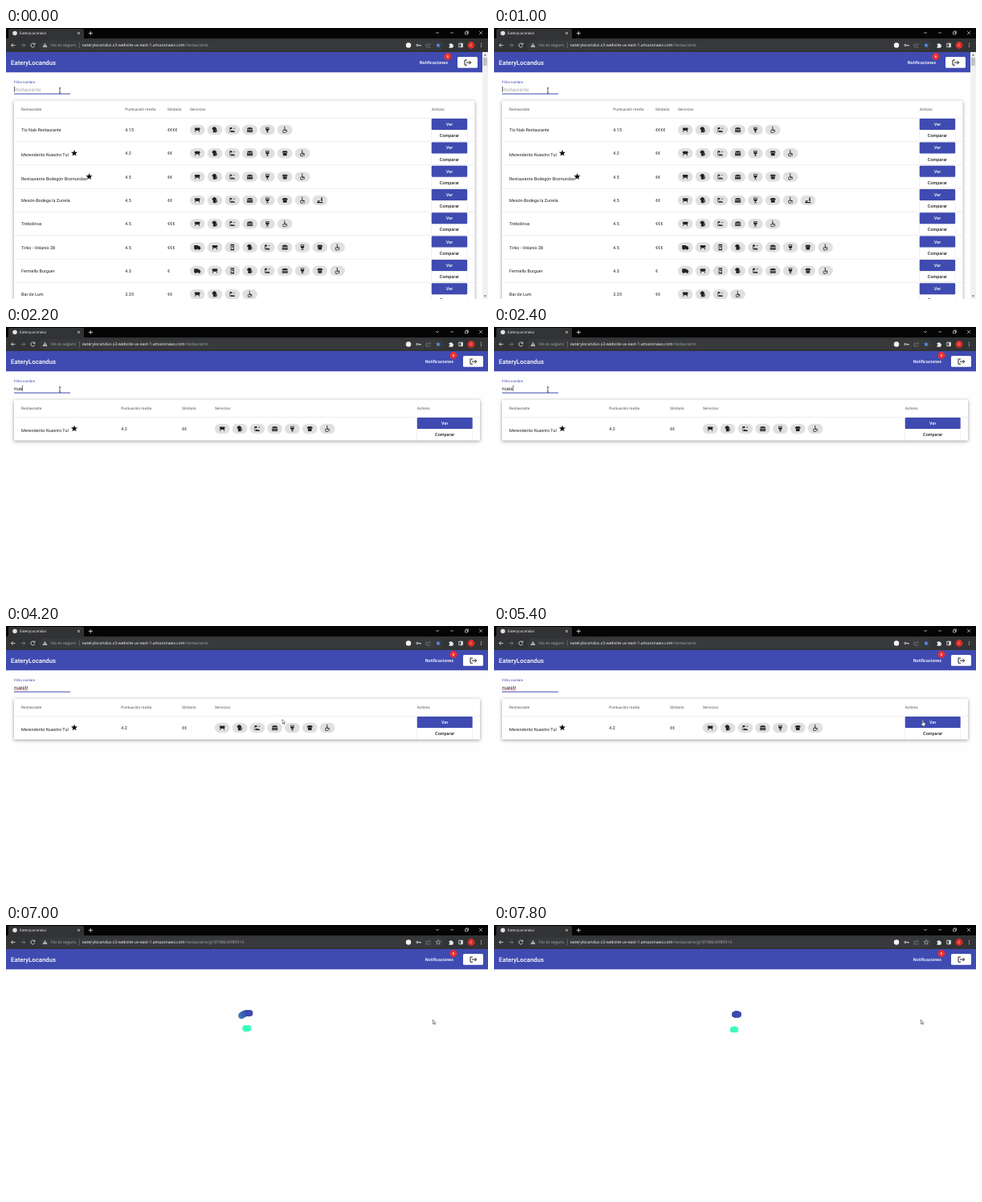
An HTML page for the animation above (8000 ms loop, 600x338 px).

```html
<!DOCTYPE html>
<html lang="es">
<head>
<meta charset="utf-8">
<title>EateryLocandus</title>
<style>
  html, body { margin: 0; width: 100%; height: 100%; overflow: hidden; background: #fefefe; }
  svg { display: block; width: 100%; height: 100%; }
  text { font: 5.47px Roboto, sans-serif; fill: #222; text-rendering: geometricPrecision; white-space: pre; }
  .ui { font: 5.1px "Open Sans", sans-serif; fill: #fff; }
  .ui.tab { font-size: 4.5px; }
  .dim { fill: #a9acb0; }
  .title { font-size: 7.8px; font-weight: 500; fill: #fff; }
  .head { font-size: 4.69px; font-weight: 500; fill: #757575; }
  .bold { font-weight: 500; }
  .white { fill: #fff; }
  .mid { text-anchor: middle; }
  .field { font-size: 6.25px; }
  .line { fill: none; stroke: #e8eaed; stroke-width: .8; }
  .card { fill: #fff; filter: drop-shadow(0 1.5px 2px #0006); }
  .button { fill: #fff; filter: drop-shadow(0 .5px .5px #0004); }
</style>
</head>
<body>
<svg id="stage" viewBox="0 0 600 338" preserveAspectRatio="none"></svg>
<script>
const INDIGO = '#3f4bb1', MINT = '#3dfcbc';
const BRAND = 'EateryLocandus';
const LOOP = 8000, STEP = 200, FILTERED = 2200, OPENED = 5800;
const ROW = 29.3;

// Service icons on a 24 unit grid
const ICONS = {
  T: 'M4 5h16l2 6h-3l1 9h-2l-.7-5H6.7L6 20H4l1-9H2z',
  B: 'M6 10h10v1h2a2 2 0 0 1 2 2v4a2 2 0 0 1-2 2h-2v2H6zM16 13v4h2v-4zM4 11a4 4 0 0 1 2-7a5 5 0 0 1 9 1a2.5 2.5 0 0 1 1 5H6v2z',
  O: 'M3 4h8v5H5v11H3zM5 20l5-7 4 4 3-3 4 6zM16 6h5v2h-5z',
  H: 'M2 10c0-8 20-8 20 0zM2 12h20v3H2zM2 16h20v2a2 2 0 0 1-2 2H4a2 2 0 0 1-2-2z',
  W: 'M6 3h12v7a6 6 0 0 1-5 6v3h3v2H8v-2h3v-3a6 6 0 0 1-5-6zm2 2v3h8V5z',
  P: 'M2 8l5-4h10l5 4-1 2H3zM5 11h14l-1 9H6z',
  A: 'M9 3a2 2 0 1 1 4 0a2 2 0 0 1-4 0zM10 6h3v6h6v9h-2v-6h-7zM9 11v2a4 4 0 1 0 5 5h2a6 6 0 1 1-7-7z',
  D: 'M1 5h14v3h4l4 5v5h-2a3 3 0 0 1-6 0h-5a3 3 0 0 1-6 0H1z',
  K: 'M6 2h12v20H6zm2 4v12h8V6zm2 2h4v5h-4z',
  S: 'M2 18h20v3H2zM4 13h7v4H4zM16 3h4v12h-4z'
};

const RESTAURANTS = [
  ['Tío Nab Restaurante', '4.15', '€€€€', 'TBOHWA'],
  ['Merenderito Nuestro Tul', '4.2', '€€', 'TBOHWPA', 85],
  ['Restaurante Bodegón Bromundas', '4.5', '€€', 'TBOHWPA', 103.5],
  ['Mesón-Bodega la Zurrela', '4.5', '€€', 'TBOHWPAS'],
  ['Trebolinos', '4.5', '€€€', 'TBOHWA'],
  ['Tirko - Velanio 38', '4.5', '€€€', 'DTKBOHWPA'],
  ['Fermello Burguer', '4.3', '€', 'DTKBOHWPA'],
  ['Bar de Lum', '3.35', '€€', 'TBOA']
];

const text = (x, y, content, cls = '') => `<text x="${x}" y="${y}" class="${cls}">${content}</text>`;
const rect = (x, y, w, h, fill, r = 0, cls = '') =>
  `<rect x="${x}" y="${y}" width="${w}" height="${h}" rx="${r}" fill="${fill}" class="${cls}"/>`;
const circle = (x, y, r, fill) => `<circle cx="${x}" cy="${y}" r="${r}" fill="${fill}"/>`;
const line = (d, style = '') => `<path d="${d}" class="line" style="${style}"/>`;
const path = (d, fill) => `<path d="${d}" fill="${fill}" fill-rule="evenodd"/>`;
const group = (id, content) => `<g id="${id}">${content}</g>`;

function star(x, y, r, attrs) {
  const points = Array.from({ length: 10 }, (_, i) => {
    const a = i * Math.PI / 5, d = i % 2 ? r * .42 : r;
    return [x + d * Math.sin(a), y - d * Math.cos(a)].map(v => v.toFixed(2));
  });
  return `<polygon points="${points.join(' ')}" ${attrs}/>`;
}

function browser() {
  return rect(0, 0, 600, 14, '#050505') + rect(0, 13, 600, 17, '#323335')
    + path('M1 13.5q2 0 2-2V3q0-2 2-2h90q2 0 2 2v8.5q0 2 2 2z', '#323335')
    + circle(11, 6.5, 2.8, '#e0e0e0') + text(17, 8.2, BRAND, 'ui tab')
    + line('M89 5l3 3m0-3l-3 3M102.8 6.5h5m-2.5-2.5v5')
    + line('M535 5l2 2 2-2M553 6h4M589 4l4 4m0-4l-4 4M571.5 5h3v3h-3zM572.5 5V4h3v3h-1', 'stroke-width:.6')
    + rect(41, 15.2, 504, 12.8, '#38393b', 6.4)
    + line('M11.5 21.5h-5m2.2-2.3L6.4 21.5l2.3 2.3')
    + line('M18.7 21.5h5m-2.2-2.3l2.3 2.3-2.3 2.3', 'stroke:#85888c')
    + line('M35.4 20a2.5 2.5 0 1 0 .4 2.2M35.9 18.6v1.9H34')
    + path('M48.5 18.7l3 5.3h-6zm-.3 1.9v1.6h.6v-1.6zm0 2.2v.6h.6v-.6z', '#bdc1c6')
    + text(56, 23.4, 'No es seguro', 'ui dim') + rect(91, 18, .5, 7, '#85888c')
    + `<text x="95" y="23.4" class="ui">${BRAND.toLowerCase()}.s3-website-us-east-1.amazonaws.com`
    + '<tspan id="route" class="dim"></tspan></text>'
    + circle(501, 21.5, 3.2, '#f4f4f4')
    + line('M513 21.5h3.2v1.2m-1.2-1.2v1M513 21.5a1.1 1.1 0 1 0-2.2 0a1.1 1.1 0 1 0 2.2 0')
    + line('M525 20h-2v4h5v-1.3M524.5 22.5q.3-2.4 3.7-2.4m-1.2-1.4l1.4 1.4-1.4 1.4', 'stroke:#85888c;stroke-width:.6')
    + star(538, 21.6, 3.2, 'id="bookmark"')
    + path('M551.5 20h1.3a1 1 0 0 1 2 0h1.4v1.4a1 1 0 0 1 0 2v1.4h-4.7v-1.5a1 1 0 0 0 0-2z', '#e8eaed')
    + line('M563.8 19.2h4.6v4.6h-4.6z') + rect(566.3, 19.2, 2, 4.6, '#e8eaed')
    + circle(579, 21.5, 4.4, '#d92d25') + text(579, 23.2, 'C', 'ui tab mid')
    + [-2, 0, 2].map(d => circle(591.5, 21.5 + d, .6, '#e8eaed')).join('');
}

function appBar(right) {
  const x = right - 31;
  return rect(0, 30, right, 25.3, INDIGO) + text(6, 45.6, BRAND, 'title')
    + text(right - 78.3, 44.9, 'Notificaciones', 'bold white')
    + circle(right - 43, 35.5, 4.4, '#f02d2d')
    + `<text x="${right - 43}" y="37" class="white mid" style="font-size:4px;font-weight:700">0</text>`
    + rect(x, 36, 25, 13.8, '#fff', 1.5)
    + line(`M${x + 12} 40h-3v6.2h3M${x + 11} 43.1h5.5m-2-2.2l2.2 2.2-2.2 2.2`, 'stroke:#222;stroke-width:1');
}

function chips(services, x, y) {
  return [...services].map((key, i) => {
    const cx = x + 9.2 + i * 21.8;
    return rect(cx - 9.3, y - 6.2, 18.6, 12.4, '#e0e0e0', 6.2)
      + `<g transform="translate(${cx - 4.4} ${y - 4.4}) scale(.365)">${path(ICONS[key], '#222')}</g>`;
  }).join('');
}

function table(rows, columns, right, buttonWidth) {
  const [name, score, price, services, actions] = columns;
  const titles = ['Restaurante', 'Puntuación media', 'Símbolo', 'Servicios', 'Actions'];
  const center = actions + buttonWidth / 2;
  return rect(10, 90.8, right - 10, 21.5 + rows.length * ROW, '#fff', 1, 'card')
    + titles.map((title, i) => text(columns[i], 102.7, title, 'head')).join('')
    + rows.map(([label, points, symbol, offer, starX], i) => {
      const top = 112 + i * ROW, y = top + 15;
      return rect(10, top, right - 10, .5, '#dcdcdc')
        + text(name, y + (starX ? 4 : 2), label)
        + (starX ? star(starX, y - .2, 4.3, 'fill="#111"') : '')
        + text(score, y + 2, points) + text(price, y + 2, symbol)
        + chips(offer, services, y)
        + rect(actions, top + 15.6, buttonWidth, 13.4, '#fff', 1.2, 'button')
        + rect(actions, top + 1.1, buttonWidth, 14, INDIGO, 1.2)
        + text(center, top + 10, 'Ver', 'bold white mid')
        + text(center, top + 24.2, 'Comparar', 'bold mid');
    }).join('');
}

function scrollbar() {
  return rect(593, 30, 7, 308, '#f1f1f1') + rect(594, 37, 5, 10, '#c1c1c1')
    + path('M595 34.5l1.5-2 1.5 2zM595 333.5l1.5 2 1.5-2z', '#555');
}

const filter = `<text x="10" y="69" style="font-size:4.4px;fill:${INDIGO}">Filtro nombre</text>`
  + '<text id="query" x="10" y="78.5" class="field"></text>'
  + rect(10, 81.6, 70, 1, INDIGO)
  + '<rect id="caret" y="72.5" width=".6" height="7.6" fill="#222"/>'
  + `<path id="spelling" d="M10 79.7${'q.6-.9 1.2 0t1.2 0'.repeat(7)}" fill="none" stroke="#d33" stroke-width=".5"/>`;

const stage = document.getElementById('stage');
stage.innerHTML = rect(0, 0, 600, 338, '#fefefe')
  + group('fullList', appBar(593) + table(RESTAURANTS, [19, 148.3, 201, 229, 529.7], 583.5, 44.5) + scrollbar())
  + group('narrowBar', appBar(600))
  + group('match', table([RESTAURANTS[1]], [19, 143.3, 219, 260, 511.7], 590, 69))
  + group('filter', filter) + group('loader', '') + browser()
  + group('pointer',
    line('M-1.2-3.2h2.4M0-3.2v6.4M-1.2 3.2h2.4', 'stroke:#222;stroke-width:.7')
    + '<path d="M0 0v5.4l1.3-1.1 .8 1.9 .9-.4-.8-1.8h1.6z" fill="#fff" stroke="#222" stroke-width=".5"/>'
    + '<path d="M-.8 3.2L-2 2.2q-.9 0-.4.8L-.6 5.8h3l.6-3.2q0-.8-1.8-1L.6 1.4v-3.2q-.7-1-1.4 0z" fill="#fff" stroke="#222" stroke-width=".5"/>');

const el = id => document.getElementById(id);
const show = (node, visible) => node.setAttribute('display', visible ? 'inline' : 'none');
const lerp = (a, b, k) => a + (b - a) * k;
const ramp = (t, from, to) => {
  const k = Math.min(1, Math.max(0, (t - from) / (to - from)));
  return k * k * (3 - 2 * k);
};

// Moment at which each letter of the query appears
const KEYS = [1600, 1800, 2200, 2400, 2600, 2700];

function drawQuery(t) {
  const typed = 'nuestr'.slice(0, KEYS.filter(k => k <= t).length);
  const query = el('query');
  query.textContent = typed || 'Restaurante';
  query.style.fill = typed ? '#222' : '#aaa';
  const lastKey = typed ? KEYS[typed.length - 1] : 0;
  el('caret').setAttribute('x', typed ? 10.2 + query.getComputedTextLength() : 10);
  show(el('caret'), (t - lastKey) % 1000 < 500);
  show(el('spelling'), t >= 3800);
}

function drawPointer(t) {
  const first = ramp(t, 3600, 4200), second = ramp(t, 4200, 4800), opened = t >= OPENED;
  const x = opened ? 531.3 : lerp(lerp(67, 344, first), 534, second);
  const y = opened ? 118 : lerp(lerp(78, 116.5, first), 119, second);
  el('pointer').setAttribute('transform', `translate(${x} ${y})`);
  const shape = t < 3800 ? 0 : opened || t < 4800 ? 1 : 2;
  [...el('pointer').children].forEach((node, i) => show(node, i === shape));
}

// A dotted arc that opens and closes beside a small mint trail
function drawLoader(t) {
  const open = (1 + Math.cos((t - 6400) / 1400 * 3 * Math.PI)) / 2;
  const radius = lerp(11, 19.6, open), span = lerp(.4, Math.PI, open);
  const first = lerp(-.2, 0, open), centerX = lerp(302, 300, open);
  let dots = '';
  for (let i = 36; i >= 0; i--) {
    const a = first + span * i / 36;
    const mint = Math.min(100, Math.max(0, a / Math.PI * 130));
    dots += circle(centerX - radius * Math.sin(a), 122.4 - radius * Math.cos(a), 3.7,
      `color-mix(in srgb, ${MINT} ${mint}%, ${INDIGO})`);
  }
  for (let i = 0; i < 9; i++) {
    const k = i / 8;
    dots += circle(lerp(297.5, 300, open) + k * lerp(3, 6.3, open), lerp(130.4, 122.8 - k, open), 3.7, MINT);
  }
  el('loader').innerHTML = dots;
}

function render(now) {
  const t = Math.floor(now % LOOP / STEP) * STEP;
  const filtered = t >= FILTERED, opened = t >= OPENED;
  show(el('fullList'), !filtered);
  show(el('narrowBar'), filtered);
  show(el('match'), filtered && !opened);
  show(el('filter'), !opened);
  show(el('loader'), opened);
  el('route').textContent = '/restaurants' + (opened ? '/g187486/d985914' : '');
  el('bookmark').setAttribute('style', opened
    ? 'fill:none;stroke:#bdc1c6;stroke-width:.6' : 'fill:#5c93f0');
  drawQuery(t);
  drawPointer(t);
  if (opened) drawLoader(t);
}

const start = performance.now();
function tick() {
  render(performance.now() - start);
  requestAnimationFrame(tick);
}
tick();
</script>
</body>
</html>
```
